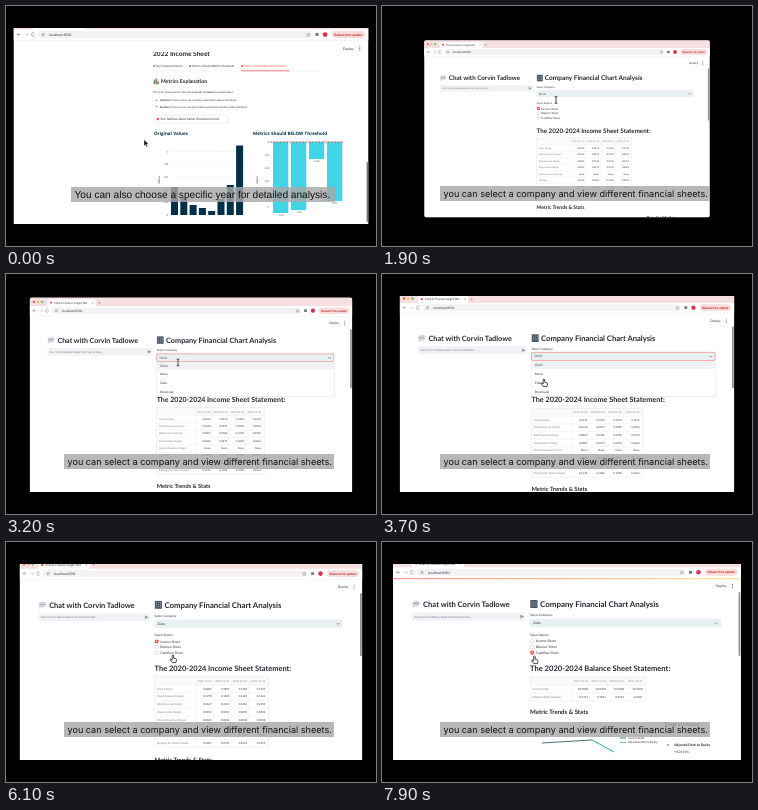
These frames come from a looping animation (370 by 240 pixels, 8 s). An HTML page:

```html
<!DOCTYPE html>
<html lang="en">
<head>
<title>Financial chart walkthrough</title>
<style>
  html, body { margin: 0; width: 100%; height: 100%; overflow: hidden; background: #000; }
  svg { display: block; width: 370px; height: 240px; }
  text { font-family: Lato, "Open Sans", sans-serif; text-rendering: geometricPrecision; white-space: pre; }
  .plot { font-family: "Open Sans", sans-serif; }
  #captionYear text { font-family: "Liberation Sans", Arial, sans-serif; }
  #captionCompany text { font-family: Inter, sans-serif; }
</style>
</head>
<body>
<svg id="stage" viewBox="0 0 370 240"></svg>
<script>
const LOOP = 8000, CUT = 1700;
const INK = '#31333f', NAVY = '#003049', CYAN = '#41d3e6', RED = '#ff4b4b', FIELD = '#f0f2f6', LINE = '#e3e4e8';
const PERSON = 'Corvin Tadlowe';
const COMPANIES = ['Ovrin', 'Kelva', 'Zubo', 'Brunovale'];

// Markup helpers
const rect = (x, y, w, h, fill, extra = '') => `<rect x="${x}" y="${y}" width="${w}" height="${h}" fill="${fill}" ${extra}/>`;
const dot = (x, y, r, fill, extra = '') => `<circle cx="${x}" cy="${y}" r="${r}" fill="${fill}" ${extra}/>`;
const path = (d, stroke, width = 0.5, extra = '') => `<path d="${d}" fill="none" stroke="${stroke}" stroke-width="${width}" ${extra}/>`;
const text = (x, y, size, str, fill = INK, extra = '') =>
  `<text x="${x}" y="${y}" font-size="${size}" fill="${fill}" ${extra}>${str}</text>`;
const bold = (x, y, size, str, fill = '#262730', extra = '') => text(x, y, size, str, fill, 'font-weight="700" ' + extra);
const group = (id, body) => `<g id="${id}">${body}</g>`;

function chrome() {
  const lights = ['#f4605a', '#f6be50', '#60c554'].map((c, i) => dot(15.5 + i * 4.4, 20.8, 1.3, c)).join('');
  return rect(11, 16, 348, 9.5, '#f5dfe1') + lights
    + rect(30, 18, 52, 8, '#fff', 'rx="1.5"') + dot(34, 21.5, 1.2, RED)
    + text(37, 22.7, 3.1, 'Chat &amp; Finance Insight Bot') + text(78, 22.7, 3.2, '&#215;') + text(85, 23, 4, '+')
    + rect(11, 25.5, 348, 10.5, '#fff') + rect(35, 26.8, 268, 7, '#f3f2f4', 'rx="3.5"')
    + path('M18 30.3h-3.4l1.4-1.4m-1.4 1.4l1.4 1.4', '#666') + path('M22 30.3h3.4l-1.4-1.4m1.4 1.4l-1.4 1.4', '#bbb')
    + path('M31.6 29.4a1.7 1.7 0 1 0 .1 1.6', '#666')
    + dot(40, 30.3, 1.2, 'none', 'stroke="#666" stroke-width=".5"') + text(46, 31.5, 3.4, 'localhost:8501')
    + path('M300 28.6l.6 1.2 1.3.1-1 .9.3 1.3-1.2-.7-1.2.7.3-1.3-1-.9 1.3-.1z', '#777', 0.4)
    + rect(307, 28.8, 3, 3, '#777', 'rx=".6"') + dot(316.5, 30.3, 2.3, '#d9304f')
    + rect(323, 26.8, 32.5, 7, '#fbdcdc', 'rx="3.5"') + bold(325.5, 31.4, 3.2, 'Relaunch to update', '#b3261e')
    + path('M11 36.1H359', '#e8e6e8', 0.4);
}

const header = text(334, 45.2, 3.4, 'Deploy') + [42.2, 44, 45.8].map(y => dot(350.5, y, 0.5, INK)).join('');

function barIcon(x, y) {
  return rect(x, y, 6, 6, '#e8ece9') + rect(x + 0.6, y + 2, 1.3, 4, '#2e9d57')
    + rect(x + 2.4, y + 0.5, 1.3, 5.5, '#d8453f') + rect(x + 4.2, y + 3, 1.3, 3, '#3272b8');
}

// First scene: the yearly metrics, laid out for zero scroll
function yearlySheet() {
  const tabs = [[147, 'Key Financial Metrics'], [183, 'Metrics Should ABOVE Threshold'], [235, 'Metrics Should BELOW Threshold']]
    .map(([x, s], i) => dot(x + 1.2, 60, 1.1, ['#6a8caf', '#4f9f6c', RED][i])
      + text(x + 3, 61.1, 2.85, s, i === 2 ? RED : INK)).join('');
  const tops = [181, 192, 199, 202, 205, 193, 179, 139.5];
  const navyBars = tops.map((y, i) => rect(165 + i * 9.3, y, 7, 209 - y, NAVY)).join('');
  const ends = [207, 204, 153, 195];
  const cyanBars = ends.map((y, i) => rect(267 + i * 18, 136, 15.3, y - 136, CYAN)
    + text(274.6 + i * 18, y + 3.2, 2.5, ((136 - y) / 65).toFixed(2), INK, 'class="plot" text-anchor="middle"')).join('');
  const axis = (x, y0, values, step, right) => values.map((v, i) =>
    path(`M${x + 1} ${y0 + i * step}H${right}`, '#eceef2', 0.4)
    + text(x, y0 + i * step + 1, 2.7, v, INK, 'class="plot" text-anchor="end"')).join('');
  const sideTitle = x => text(0, 0, 3, 'Value', INK, `class="plot" text-anchor="middle" transform="translate(${x} 174) rotate(-90)"`);
  return rect(148, 30, 165, 4.6, FIELD, 'rx="1"') + text(151, 33, 3, '2022')
    + bold(147, 49.6, 6.6, '2022 Income Sheet')
    + tabs + path('M147 65H313', LINE, 0.5) + path('M235 64.8H284', RED, 0.7)
    + barIcon(147.2, 72.2) + bold(155, 77.4, 5.2, 'Metrics Explanation')
    + text(147, 87, 2.6, 'This chart shows metrics that should ideally be <tspan font-weight="700">below</tspan> threshold values:')
    + dot(150.7, 94.4, 0.5, INK) + text(154, 95.3, 2.55, '<tspan font-weight="700">Gold bars:</tspan> These metrics are meeting expectations (below threshold)')
    + dot(150.7, 100.6, 0.5, INK) + text(154, 101.5, 2.55, '<tspan font-weight="700">Red bars:</tspan> These metrics are above their expected thresholds (needs attention!)')
    + rect(148, 109, 74, 8.2, '#fff', 'rx="1.3" stroke="#d9dade" stroke-width=".5"')
    + dot(151.8, 113.1, 1.3, RED) + text(154.5, 114.2, 3.1, 'Ask Tadlowe about below threshold metrics')
    + bold(148, 129.3, 4.5, 'Original Values', NAVY, 'class="plot"')
    + bold(247, 129.3, 4.5, 'Metrics Should BELOW Threshold', NAVY, 'class="plot"')
    + axis(162, 145.5, ['1', '0.8', '0.6', '0.4', '0.2', '0'], 12.7, 239) + sideTitle(153.5) + navyBars
    + axis(263, 136, ['0', '-0.2', '-0.4', '-0.6', '-0.8', '-1'], 13, 338) + sideTitle(251.5) + cyanBars
    + path('M264 136H338', '#e5302c', 0.8, 'stroke-dasharray="2 1.2"');
}

function table(names, dates, cell) {
  const bottom = 143.3 + names.length * 7.9;
  let out = rect(148, 135, 116, 8.3, '#fafafb') + rect(148, 135, 116, bottom - 135, 'none', `stroke="${LINE}" stroke-width=".5"`);
  const columns = [206, 224, 242, 260.5];
  columns.forEach((x, c) => {
    out += text(x, 140.2, 2.7, dates[c], '#888b94', 'text-anchor="end"') + path(`M${x - 16.5} 135V${bottom}`, LINE, 0.35);
  });
  names.forEach((name, r) => {
    const y = 148 + r * 7.9;
    out += path(`M148 ${y - 4.7}h116`, LINE, 0.35) + text(150.5, y, 2.75, name, '#777a84');
    columns.forEach((x, c) => out += text(x, y, 2.75, cell(r, c), INK, 'text-anchor="end"'));
  });
  return out;
}

const years = suffix => [2024, 2023, 2022, 2021].map(y => `${y}-${suffix}`);
const incomeRows = ['Gross Margin', 'SG&amp;A Expense Margin', 'R&amp;D Expense Margin', 'Depreciation Margin',
  'Interest Expense Margin', 'Tax Rate', 'Net Income Margin', 'Earnings Per Share Growth'];
const incomeTable = (suffix, latest) => table(incomeRows, years(suffix),
  (r, c) => latest[r] ? (latest[r] * (1 - 0.032 * c + 0.012 * Math.sin(r * 3 + c * 2) * c)).toFixed(4) : 'None');
const trends = y => bold(148, y, 6.1, 'Metric Trends &amp; Stats') + bold(282, y + 12, 5, 'Trend in Motion');

function balanceSheet() {
  return table(['Current Debt', 'Adjusted Debt to Equity'], years('12-31'),
      (r, c) => r ? (0.4151 - 0.031 * c).toFixed(4) : (22.9 + 1.13 * c * c).toFixed(4))
    + trends(172.3)
    + path('M160 201L185 199.5 210 198', NAVY, 0.7) + path('M210 198L232 210', '#2ba9b5', 1)
    + path('M238 196h6', NAVY, 0.7) + text(246, 197, 2.8, 'Current Debt')
    + path('M238 200.5h6', '#2ba9b5', 0.7) + text(246, 201.5, 2.8, 'Adjusted Debt to Equity')
    + dot(286, 203, 0.7, INK) + bold(292, 204.3, 3.4, 'Adjusted Debt to Equity') + text(292, 211, 3.3, '+0.0151%');
}

// Second scene: the company page at full window size
function companyPage() {
  const radios = ['Income Sheet', 'Balance Sheet', 'Cashflow Sheet'].map((s, i) =>
    dot(150.2, 99.2 + i * 5.7, 1.8, '#fff', 'class="radio"') + text(153.7, 100.4 + i * 5.7, 3.4, s)).join('');
  const options = COMPANIES.map((s, i) => text(151.5, 91 + i * 9.2, 3.4, s)).join('');
  return '<ellipse cx="34" cy="61.6" rx="3.8" ry="3" fill="#d3d8df"/><path d="M31 63l-.6 3 3-1.5z" fill="#d3d8df"/>'
    + [32, 34, 36].map(x => dot(x, 61.6, 0.5, '#555')).join('')
    + bold(41, 64.9, 7.6, 'Chat with ' + PERSON)
    + rect(30, 70.5, 113, 8, FIELD, 'rx="1.5"') + text(32.5, 75.6, 2.9, `Ask ${PERSON} about the financial data...`, '#777a84')
    + '<path d="M138 72.8l4 1.8-4 1.8.6-1.8z" fill="#8b8e98"/>'
    + rect(148.3, 58, 7.2, 8, '#4c5562') + [0, 1, 2].map(i => path(`M149.5 ${59.8 + i * 2}h5`, '#a9c4d6', 0.8, 'stroke-dasharray="1 1"')).join('')
    + bold(158, 64.9, 7.95, 'Company Financial Chart Analysis')
    + text(148, 74.3, 3.1, 'Select Company:')
    + rect(148, 76.8, 191, 8.4, '#e8f1f2', 'id="select" rx="1.3" stroke-width=".5"') + text(151, 82.1, 3.4, '', INK, 'id="company"')
    + path('M333 80.4l1.4 1.4 1.4-1.4', '#555', 0.6)
    + text(148, 94, 3.1, 'Select Report:') + radios
    + bold(148, 128.8, 7.57, '', '#262730', 'id="sheetTitle"')
    + group('incomeOld', incomeTable('09-30', [0.4622, 0.1040, 0.0802, 0.0285, 0, 0.2409, 0.2397, 0.1134]) + trends(221.3))
    + group('incomeNew', incomeTable('12-31', [0.8067, 0.1770, 0.2667, 0.0942, 0.0043, 0.1175, 0.3791, 0.6047]) + trends(221.3))
    + group('balance', balanceSheet())
    + group('menu', rect(147.5, 85.8, 192.5, 37, '#d9dade', 'rx="1.5"') + rect(147.8, 85.8, 191.8, 36.4, '#fff', 'rx="1.5"')
      + rect(147.8, 86, 191.8, 8, '#f1f2f5') + options)
    + rect(356.6, 50, 1.8, 64, '#8f9096', 'rx=".9"')
    + group('progress', rect(11, 36.2, 348, 1, 'url(#warm)'));
}

const caption = (id, x, y, w, size, str) =>
  group(id, rect(x, y, w, 15, '#a9a9a9', 'fill-opacity=".82"') + text(x + 3.5, y + 10.7, size, str, '#111'));

const stage = document.getElementById('stage');
stage.innerHTML = `<defs>
  <clipPath id="view"><rect y="22" width="370" height="196"/></clipPath>
  <clipPath id="frame"><rect x="11" y="16" width="348" height="216" rx="2.5"/></clipPath>
  <clipPath id="scroller"><rect x="8" y="46" width="352" height="172"/></clipPath>
  <linearGradient id="warm"><stop stop-color="#ff7d7d"/><stop offset="1" stop-color="#ffe27a"/></linearGradient></defs>`
  + rect(0, 0, 370, 240, '#000')
  + '<g clip-path="url(#view)">'
  + group('win', '<g clip-path="url(#frame)">' + rect(11, 16, 348, 216, '#fff') + chrome() + header + group('page', companyPage()) + '</g>')
  + group('yearly', '<g clip-path="url(#scroller)">' + group('sheet', yearlySheet()) + '</g>' + rect(360.6, 156, 1.8, 60, '#77787d', 'rx=".9"'))
  + '</g>'
  + caption('captionYear', 65, 181, 264, 10.14, 'You can also choose a specific year for detailed analysis.')
  + caption('captionCompany', 58, 180, 270, 9.1, 'you can select a company and view different financial sheets.')
  + group('arrow', '<path d="M0 0V6.6L1.6 5.2 2.6 7.5 3.6 7 2.6 4.8H4.7z" fill="#111" stroke="#fff" stroke-width=".4"/>')
  + group('beam', path('M-1.4 -3.5Q0 -3.5 0 -2.6Q0 -3.5 1.4 -3.5M0 -2.8V2.8M-1.4 3.5Q0 3.5 0 2.6Q0 3.5 1.4 3.5', '#222', 0.8))
  + group('hand', '<path d="M-.8 -3.6Q0 -4.3.7 -3.6V-.8L2.9 -.2Q3.7 .1 3.5 1L2.9 3.6H-.8L-2.9 .7Q-2.7 -.2-1.8 .2L-.8 1z" fill="#fff" stroke="#111" stroke-width=".75" stroke-linejoin="round"/>');

const $ = id => document.getElementById(id);
const show = (id, on) => $(id).setAttribute('display', on ? 'inline' : 'none');
const radios = [...document.querySelectorAll('.radio')];
const smooth = u => u * u * (3 - 2 * u);

// Interpolates [time, ...values] rows
function track(rows, t, ease = u => u) {
  if (t <= rows[0][0]) return rows[0].slice(1);
  const i = rows.findIndex(row => row[0] > t);
  if (i < 0) return rows[rows.length - 1].slice(1);
  const a = rows[i - 1], b = rows[i], u = ease((t - a[0]) / (b[0] - a[0]));
  return a.slice(1).map((v, k) => v + (b[k + 1] - v) * u);
}

const windowLeft = [[CUT, 45], [3600, 18], [4500, 15], [5400, 14], [6300, 13.5], [7200, 11.2], [LOOP, 11]];
const scroll = [[200, 0], [1000, 15]];
const pointer = [[CUT, 174, 94], [2500, 174, 94], [2800, 172, 88.5], [3350, 172, 88.5], [3700, 162, 109], [3950, 162, 109],
  [4450, 167, 117], [6300, 167, 117], [6600, 152, 107], [7100, 152, 107], [7450, 152.5, 118]];

function draw(t) {
  const first = t < CUT;
  const left = first ? 7.5 : track(windowLeft, t)[0];
  $('win').setAttribute('transform', `translate(185 118) scale(${(370 - 2 * left) / 348}) translate(-185 -118)`);
  ['yearly', 'captionYear', 'arrow'].forEach(id => show(id, first));
  ['page', 'captionCompany'].forEach(id => show(id, !first));
  $('sheet').setAttribute('transform', `translate(0 ${track(scroll, t, smooth)[0]})`);

  const open = t >= 2800 && t < 3900, onBalance = t >= 7100;
  show('menu', open);
  $('select').setAttribute('stroke', open ? RED : 'none');
  $('company').textContent = COMPANIES[t < 3900 ? 0 : 2];
  $('sheetTitle').textContent = `The 2020-2024 ${onBalance ? 'Balance' : 'Income'} Sheet Statement:`;
  show('incomeOld', t < 5200);
  show('incomeNew', t >= 5200 && !onBalance);
  show('balance', onBalance);
  show('progress', t >= 7600);

  const chosen = t < 6700 ? 0 : t < 7600 ? 1 : 2;
  radios.forEach((r, i) => {
    r.setAttribute('stroke', i === chosen ? RED : '#c3c5cc');
    r.setAttribute('stroke-width', i === chosen ? 1.4 : 0.5);
    r.setAttribute('r', i === chosen ? 1.4 : 1.8);
  });

  const [x, y] = track(pointer, t, smooth);
  const beam = t < 3350;
  show('beam', !first && beam);
  show('hand', !first && !beam);
  $('arrow').setAttribute('transform', 'translate(138 133.5)');
  ['beam', 'hand'].forEach(id => $(id).setAttribute('transform', `translate(${x} ${y})`));
}

const start = performance.now();
function tick() {
  draw((performance.now() - start) % LOOP);
  requestAnimationFrame(tick);
}
tick();
</script>
</body>
</html>
```
